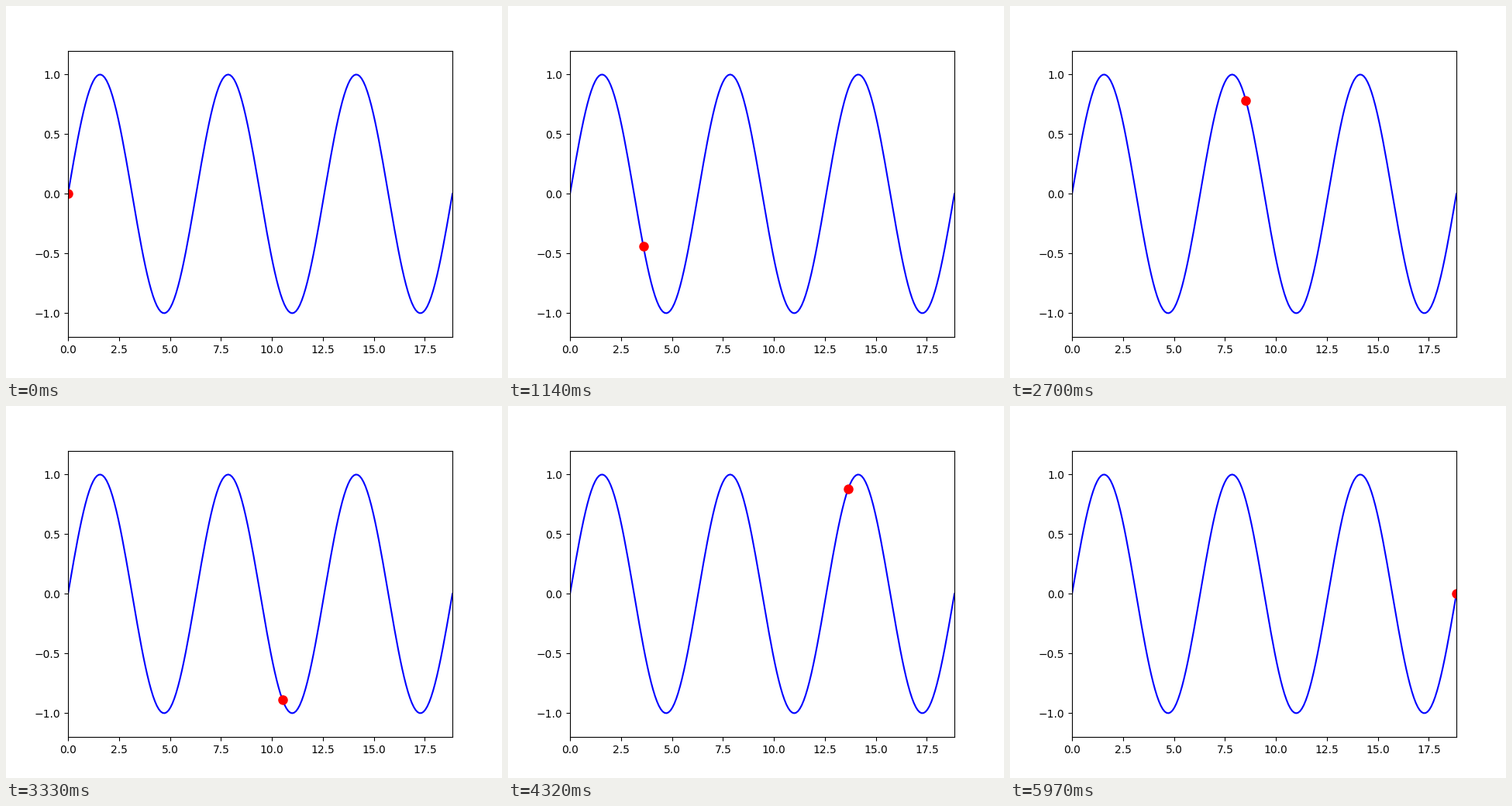
These frames come from a looping animation (640x480 px, 6000 ms). A matplotlib script:

```python
import numpy as np
import matplotlib.pyplot as plt
from matplotlib.animation import FuncAnimation

FRAMES = 200
INTERVAL = 30  # ms

x = np.linspace(0, 6 * np.pi, FRAMES)
y = np.sin(x)

fig, ax = plt.subplots(figsize=(6.4, 4.8), dpi=100)
ax.set_xlim(0, 6 * np.pi)
ax.set_ylim(-1.2, 1.2)
ax.plot(x, y, "b-", lw=1.5)
dot, = ax.plot([], [], "ro", markersize=8)


def init():
    dot.set_data([x[0]], [y[0]])
    return dot,


def update(i):
    dot.set_data([x[i]], [y[i]])
    return dot,


anim = FuncAnimation(fig, update, frames=FRAMES, init_func=init,
                     interval=INTERVAL, blit=True, repeat=True, repeat_delay=0)

plt.show()
```
